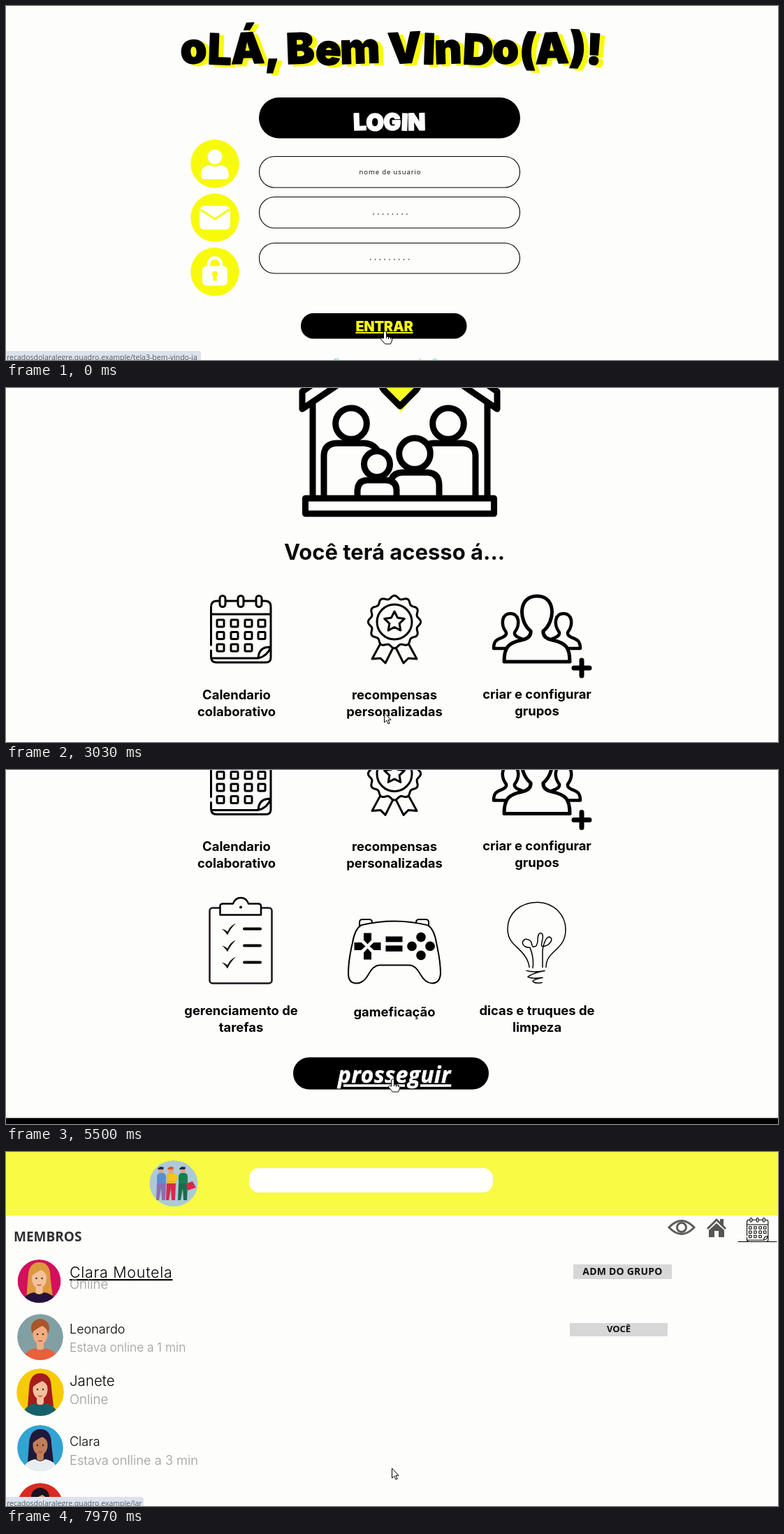
An HTML page that plays this animation: 1105 by 507 pixels, repeating every 8000 ms.

```html
<!DOCTYPE html>
<html lang="pt">
<head>
<meta charset="utf-8">
<style>
  html, body { margin: 0; width: 100%; height: 100%; overflow: hidden; background: #fdfdfb; }
  svg { display: block; width: 1105px; height: 507px; }
  text { white-space: pre; }
  .display { font-family: Inter, sans-serif; font-weight: 900; stroke-width: 1.6; stroke-linejoin: round; }
  .body { font-family: Lato, sans-serif; letter-spacing: 1px; word-spacing: 2.6px; stroke: #000; stroke-width: .5; }
  .label { font-family: Inter, sans-serif; font-weight: 700; }
  .name { font-family: Inter, sans-serif; font-weight: 300; }
  .open { font-family: "Open Sans", sans-serif; }
  .bold { font-family: "Open Sans", sans-serif; font-weight: 700; }
  .mid { text-anchor: middle; }
  .italic { font-style: italic; }
  .link { text-decoration: underline; }
  .line { fill: #fdfdfb; stroke: #000; stroke-linejoin: round; stroke-linecap: round; }
  .open-line { fill: none; stroke: #000; stroke-linejoin: round; stroke-linecap: round; }
</style>
</head>
<body>
<svg id="stage" viewBox="0 0 1105 507"></svg>
<script>
const stage = document.getElementById('stage');
const PAPER = '#fdfdfb', YELLOW = '#f8fa0c';

const text = (x, y, size, cls, str, fill = '#000', extra = '') =>
  `<text x="${x}" y="${y}" font-size="${size}" class="${cls}" fill="${fill}" ${extra}>${str}</text>`;
const box = (x, y, w, h, r, fill, extra = '') =>
  `<rect x="${x}" y="${y}" width="${w}" height="${h}" rx="${r}" fill="${fill}" ${extra}/>`;
const dot = (x, y, r, fill, extra = '') => `<circle cx="${x}" cy="${y}" r="${r}" fill="${fill}" ${extra}/>`;
const line = (d, w, cls = 'open-line', extra = '') => `<path d="${d}" class="${cls}" stroke-width="${w}" ${extra}/>`;
const fill = (d, color, extra = '') => `<path d="${d}" fill="${color}" ${extra}/>`;
const at = (x, y, content, scale = 1) => `<g transform="translate(${x} ${y}) scale(${scale})">${content}</g>`;
const each = (list, fn) => list.map(fn).join('');

function title(x, y, size, str, dx, dy, rotate) {
  const tilt = `rotate="${rotate}"`;
  return text(x + dx, y + dy, size, 'display mid', str, YELLOW, `${tilt} stroke="${YELLOW}"`) +
    text(x, y, size, 'display mid', str, '#000', `${tilt} stroke="#000"`);
}

function polar(n, radius) {
  return 'M' + Array.from({ length: n }, (_, i) => {
    const a = i / n * 2 * Math.PI, r = radius(i, a);
    return (r * Math.sin(a)).toFixed(1) + ' ' + (-r * Math.cos(a)).toFixed(1);
  }).join('L') + 'Z';
}

const calendar =
  line('M1.5 72V18Q1.5 9 9 9H79Q87 9 87 17V90Q87 97 80 97H9Q1.5 97 1.5 89V80M1.5 28H87M2 91H69Q82 88 87 75Q70 74 69 91', 3) +
  each([18, 44, 70], x => box(x - 4, 1.5, 8, 16, 4, PAPER, 'stroke="#000" stroke-width="3"')) +
  each([36, 53.5, 71], (y, r) => each([10, 30, 50, 69].slice(0, r === 2 ? 3 : 4),
    x => box(x, y, 10, 10, 1.5, 'none', 'stroke="#000" stroke-width="3"')));

const tail = line('M-20 31L-32 53L-20 52L-13 59L-1 35', 3);
const ribbon = tail + `<g transform="scale(-1 1)">${tail}</g>` +
  line(polar(120, (i, a) => 35.5 + 2.2 * Math.cos(12 * a)), 3, 'line') +
  dot(0, 0, 25, 'none', 'stroke="#000" stroke-width="3"') +
  line(polar(10, i => i % 2 ? 7.5 : 15), 3);

// Login
const icons = [
  dot(0, -10, 10.5, '#fff') + fill('M-20 16Q-19 2 -7 2Q0 6 7 2Q19 2 20 16Q20 22 14 22H-14Q-20 22 -20 16Z', '#fff'),
  box(-22, -17, 44, 34, 7, '#fff') + `<path d="M-21 -12L0 2L21 -12" fill="none" stroke="${YELLOW}" stroke-width="3"/>`,
  box(-18, -8, 36, 28, 6, '#fff') + '<path d="M-9 -6V-11A9 9 0 0 1 9 -11V-6" fill="none" stroke="#fff" stroke-width="4.5"/>' +
    dot(0, 3, 4, YELLOW) + fill('M-2 4H2L3 13H-3Z', YELLOW)
];
const login =
  title(551.5, 83, 60.5, 'oLÁ, Bem VInDo(A)!', 7, 3, '-3 2 -2 0 0 -2 3 -2 0 -3 2 -2 3 -2 2 -2 2 3') +
  box(362, 131, 374, 58.5, 29, '#000') +
  text(549, 178, 33, 'display mid', 'LOGIN', '#fff', 'stroke="#fff" rotate="-2 2 -2 2 -1"') +
  each([[215, 45], [273, 45], [339, 44]], ([y, h]) =>
    box(362.5, y + .5, 373, h - .5, 22, PAPER, 'stroke="#000" stroke-width="1.1"')) +
  text(550, 241, 9.5, 'open mid', 'nome de usuario', '#000', 'letter-spacing=".9"') +
  text(552, 299, 10, 'bold mid', '........', '#243', 'letter-spacing="4"') +
  text(551, 364, 10, 'bold mid', '.........', '#243', 'letter-spacing="4"') +
  each(icons, (icon, i) => at(299, 226 + 77.3 * i, dot(0, 0, 34.7, YELLOW) + icon)) +
  box(422, 440, 237.5, 36.5, 18, '#000') +
  text(541.5, 466, 20, 'display mid link', 'ENTRAR', YELLOW, 'letter-spacing="-.3"') +
  text(543, 517, 17, 'open mid', 'Esqueceu a senha?', '#6fe0e4');

// Introduction, laid out as one tall scrolling page
const house =
  line('M439 433V570M689 433V570', 9) +
  line('M564 322L703 417V442L564 347L424 442V417Z', 9, 'line') +
  fill('M536 411L565 446L591 415Z', YELLOW) +
  line('M564 438L541 415C530 401 544 388 556 395Q562 399 564 404Q566 399 572 395C584 388 598 401 587 415Z', 9, 'open-line', 'style="fill:#f8fb22"') +
  line('M455 568V508Q456 491 475 491H513Q529 492 535 508V568', 9, 'line') +
  line('M672 568V508Q671 491 652 491H612Q596 492 592 508V568', 9, 'line') +
  each([494, 633], x => dot(x, 463, 22.3, PAPER, 'stroke="#000" stroke-width="9"')) +
  line('M551 568V545Q554 533 568 533H604Q620 534 620 552V568', 9, 'line') +
  dot(585, 506, 22.3, PAPER, 'stroke="#000" stroke-width="9"') +
  line('M503 568V558Q504 544 518 544H544Q559 545 559 558V568', 9, 'line') +
  dot(531, 521, 18.5, PAPER, 'stroke="#000" stroke-width="9"') +
  box(428.5, 570, 270, 22, 0, PAPER, 'class="line" stroke-width="9"');

const sidePerson = line('M698 373C698 361 704 360 711 357Q717 354 716 350C707 338 710 323 722 323C734 323 737 338 728 350Q727 354 733 357L740 360V373Z', 4.5, 'line');
const team = sidePerson + `<g transform="translate(1520 0) scale(-1 1)">${sidePerson}</g>` +
  line('M713 392C713 370 720 365 738 361Q752 358 751 348C734 335 732 298 760 298C788 298 786 335 769 348Q768 358 782 361C800 365 807 370 807 392Z', 5, 'line') +
  line('M813 401H835M824 390V412', 7);

const clipboard =
  box(291.5, 280, 89, 108, 4, PAPER, 'stroke="#1b1418" stroke-width="2.5"') +
  line('M306.5 290V278Q306 274 311 274H325Q328 265.5 336 265.5Q344 265.5 347 274H361Q365 274 365 278V290Z', 2.5, 'line') +
  dot(336, 279, 2, '#000') +
  each([310, 334, 358], y => fill(`M309 ${y}Q314 ${y + 1} 317 ${y + 4}Q321 ${y - 5} 329 ${y - 8}Q321 ${y} 317 ${y + 9}Q314 ${y + 4} 309 ${y}Z`, '#1b1418') +
    line(`M341 ${y}H364`, 4));

const gamepad =
  each([506, 587], x => box(x, 296.5, 18, 14, 4, PAPER, 'stroke="#000" stroke-width="2"')) +
  line('M508 305Q556 293 604 305Q613 311 616 330Q622 357 622 374Q621 388 610 388Q600 388 593 375Q586 362 577 362H535Q526 362 519 375Q512 388 502 388Q490 388 490 374Q490 355 496 330Q499 311 508 305Z', 2, 'line') +
  each([0, 90, 180, 270], a => fill('M-5.5 -19H5.5V-9L0 -3L-5.5 -9Z', '#000', `transform="translate(517.5 335) rotate(${a})"`)) +
  box(543.5, 321, 24, 8, 0, '#000') + box(543.5, 334, 24, 8.5, 0, '#000') +
  each([[0, -13], [0, 13], [-13, 0], [13, 0]], ([x, y]) => dot(594 + x, 335 + y, 6.8, '#000'));

const bulb = line('M749 365Q748 353 736 341C728 333 718 327 718 310C718 288 736 272 760 272C784 272 801 290 801 311C801 342 773 340 773 365M754 366Q756 352 750 337C734 336 739 323 746 325C757 327 749 339 758 335C764 331 758 318 765 316C773 317 764 334 767 335C776 336 783 327 780 323C774 317 768 334 768 343V365M745 370Q756 373 771 370Q752 374 747 379Q752 382 768 380Q756 382 754 385Q756 389 767 387', 1.5);

const paragraph = [
  'Olá,  Esse app foi criado pra dar uma mãozinha pros',
  'filhos na hora de deixar a casa arrumada e limpa!',
  'Além disso, ele também promove um ambiente mais',
  'tranquilo e fortalece os laços familiares.'
];
const captions = [
  [330, 858, 'Calendario', 'colaborativo'], [556, 858, 'recompensas', 'personalizadas'],
  [760, 857, 'criar e configurar', 'grupos'], [336.5, 1093, 'gerenciamento de', 'tarefas'],
  [556, 1095, 'gameficação', ''], [760, 1093, 'dicas e truques de', 'limpeza']
];
const intro =
  title(561, 73, 50, 'JÁ ARRUMEI!', 6, -1, '-3 2 0 -2 2 -2 3 -2 2 -2 3') +
  each(paragraph, (str, i) => text(564.5, 147 + 46.3 * i, 34.5, 'body mid', str)) +
  house +
  text(556, 658, 31, 'label mid', 'Você terá acesso á...', '#0a0a0a') +
  at(292, 708, calendar) + at(556, 747, ribbon) + at(0, 412, team) +
  at(0, 659, clipboard + gamepad + bulb) +
  each(captions, ([x, y, a, b]) => text(x, y, 18.4, 'label mid', a) + text(x, y + 23.5, 18.4, 'label mid', b)) +
  box(411, 1153, 280, 46, 23, '#000') +
  text(556, 1190, 31.5, 'bold italic mid link', 'prosseguir', '#fff', 'letter-spacing=".6" stroke="#fff" stroke-width=".6"') +
  box(0, 1240, 1105, 300, 0, '#000');

// Group settings
const cards = [
  [253, 226, 133, 133, 319.5, 337, 'Foto do grupo'], [407, 226, 134, 133, 473, 346, 'Calendario'],
  [559, 220, 134, 139, 631, 337, 'Premios'], [720, 221, 134, 133, 787, 337, 'Membros']
];
const photo =
  '<path d="M287 297V254H346" fill="none" stroke="#000" stroke-width="4"/>' +
  box(294.5, 261, 57, 42, 0, '#f2f2f2', 'stroke="#000" stroke-width="4"') + dot(314, 269, 4.5, '#000') +
  fill('M299 299L312 278L319 288L330 270L348 299Z', '#000');
const members = '<g fill="none" stroke="#1c2340" stroke-width="2">' +
  '<path d="M765 246A8 8 0 1 1 771 259M817 246A8 8 0 1 0 811 259M776 263C760 259 749 269 755 276Q758 279 778 278M806 263C822 259 833 269 828 276Q825 279 805 278"/>' +
  '<ellipse cx="791.5" cy="300" rx="27.5" ry="10.5" fill="#fff"/>' +
  '<circle cx="791.5" cy="274.5" r="14" fill="#fff"/><path d="M778 271Q788 273 792 261Q795 272 805 273"/></g>';
const group =
  text(555, 45, 35.5, 'display mid', 'NOME DO GRUPO:', '#000', 'stroke="#000" letter-spacing="-1.5" rotate="-2 2 -1 2 0 -2 2 0 -2 2 -1 2 0"') +
  box(327, 66.5, 456, 53.5, 27, PAPER, 'stroke="#000" stroke-width="1.2"') +
  box(434, 146, 233.5, 36.5, 18, '#f7f916') +
  text(551.5, 173, 16, 'display mid', 'conFIGurações(exTrAs)', '#000', 'stroke="#000" style="stroke-width:.5"') +
  each(cards, ([x, y, w, h, tx, ty, str]) => box(x, y, w, h, 13, '#eeeeee') +
    text(tx, ty, 13.5, 'bold mid', str, '#000', 'letter-spacing=".5"')) +
  photo + at(442, 242, calendar, .735) + at(630.5, 263.5, ribbon, .78) + members +
  box(391, 396, 316.5, 9, 4.5, '#000', 'stroke="#000" stroke-width="2"') + box(393, 397, 314, 7.5, 3.7, '#f7f916') +
  box(439, 438, 200, 33, 16.5, '#000') +
  text(541.5, 462, 19.5, 'open italic mid link', 'finalizar...', '#fff');

// Member list
function avatar(i, y, r, back, hair, skin, shirt, longHair) {
  const id = 'face' + i;
  return `<clipPath id="${id}"><circle r="${r}"/></clipPath>` + at(r > 31 ? 49 : 47.5, y,
    `<g clip-path="url(#${id})">` + dot(0, 0, r, back) +
    (longHair ? fill('M-16 -6Q-15 -27 0 -27Q16 -27 16 -6L19 20H-18Z', hair) : dot(0, -13, 13, hair)) +
    box(-5, 4, 10, 14, 4, skin) + fill('M-26 38Q-25 19 -7 16Q0 22 7 16Q25 19 26 38Z', shirt) +
    `<ellipse cy="-4" rx="10.5" ry="14" fill="${skin}"/>` +
    fill('M-12 -6Q-14 -23 0 -24Q14 -23 12 -6Q9 -13 3 -16Q-6 -12 -12 -6Z', hair) +
    dot(-4, -4, 1.2, '#302020') + dot(4, -4, 1.2, '#302020') +
    line('M-3 5Q0 7 3 5', 1.5, '', 'fill="none" stroke="#c2373c"') + '</g>');
}
const person = (x, hair, top, legs) => at(x, 30,
  dot(0, -4, 4, '#e3a083') + fill('M-5 -5Q-3 -11 4 -8L3 -5Z', hair) + box(-6, 0, 13, 18, 5, top) +
  fill('M-6 15H7L6 39H1L0 22L-3 39H-7Z', legs));
const badge = '<ellipse cx="240" cy="45" rx="34.5" ry="33" fill="#adc9d6"/>' +
  person(222, '#27325c', '#5b8fd0', '#8c6fb4') + person(236, '#d6582d', '#f0b81d', '#d9284b') +
  person(253, '#1f2b4c', '#15804f', '#1c6b4c') + fill('M258 45L267 42L272 51L260 55Z', '#d9284b') + box(232, 32, 13, 9, 1, '#f5c51b');
const list =
  box(0, 0, 1105, 91, 0, '#f8fa43') + badge + box(348, 23, 349, 35, 14, '#fffffc') +
  text(11, 128, 19, 'bold', 'MEMBROS', '#303030') +
  '<g fill="none" stroke="#5c5c5c" stroke-width="3"><path d="M949 108Q967 89 985 108Q967 127 949 108Z"/><circle cx="967" cy="108" r="6.5"/></g>' +
  fill('M1003 109L1017 95L1022 100V96H1027V105L1031 109L1029 111L1017 99L1005 111ZM1006 112L1017 102L1028 112V122H1020V113H1014V122H1006Z', '#555') +
  at(1060, 94, calendar, .355) + line('M1048 128.5H1103', 1.2) +
  avatar(0, 185, 31, '#d3105b', '#dc9a3c', '#f3c19c', '#24123c', true) +
  avatar(1, 265, 33, '#82a0a3', '#a9562c', '#f0ad80', '#e8603c', false) +
  avatar(2, 344, 34, '#f6cb06', '#a51d1c', '#f3bf9c', '#14616b', true) +
  avatar(3, 424, 33, '#32a4d2', '#20183a', '#c07d57', '#e8eef0', true) +
  avatar(4, 507, 33, '#d92a20', '#171420', '#d99a70', '#333', false) +
  text(91, 180, 21.5, 'name link', 'Clara Moutela', '#000', 'letter-spacing=".7"') +
  text(91, 196, 18.5, 'name', 'Online', '#999') +
  text(91, 260, 18, 'name', 'Leonardo') + text(91, 286, 17.3, 'name', 'Estava online a 1 min', '#999') +
  text(91, 335, 20.5, 'name', 'Janete') + text(91, 361, 18.5, 'name', 'Online', '#999') +
  text(91, 421, 18, 'name', 'Clara') + text(91, 448, 18.3, 'name', 'Estava onlline a 3 min', '#999') +
  box(812, 161, 141, 21, 0, '#d7d7d7') + text(882.5, 176, 14, 'bold mid', 'ADM DO GRUPO', '#111', 'letter-spacing=".2"') +
  box(807, 245, 140, 19, 0, '#d7d7d7') + text(877, 258, 13, 'bold mid', 'VOCÊ', '#111');

const status = (w, str) => fill(`M0 494H${w - 4}Q${w} 494 ${w} 498V507H0Z`, '#dde3ec') + text(1, 507, 10.5, 'open', str, '#555b63');
const site = 'recadosdolaralegre.quadro.example';
const layer = (id, content) => `<g id="${id}">${content}</g>`;
stage.innerHTML = box(0, 0, 1105, 507, 0, PAPER) +
  layer('login', login) + layer('intro', intro) + layer('group', group) + layer('list', list) +
  layer('longStatus', status(279, site + '/tela3-bem-vindo-ja')) + layer('shortStatus', status(197, site + '/lar')) +
  layer('arrow', '<path d="M0 0V14L3.2 11L5.5 16L7.7 15L5.4 10.3H9.5Z" fill="#fff" stroke="#000"/>') +
  layer('hand', '<path d="M0 2Q2 -1 4 2V8L11 10Q13 11 12 14L10 19H2L-4 12Q-4 9 0 11Z" fill="#fff" stroke="#000"/><path d="M4 8V11M7 9V12M10 10V12" stroke="#000"/>');

const el = id => document.getElementById(id);
const show = (id, on) => el(id).style.display = on ? '' : 'none';
const ramp = (t, start, length) => Math.min(1, Math.max(0, (t - start) / length));
const ease = p => p * p * (3 - 2 * p);

const TURNS = [900, 5900, 7700];
const PAGES = ['login', 'intro', 'group', 'list'];
const NOTCHES = [1800, 1930, 2060, 2190, 2330, 3450, 3600, 3760, 4680];

function draw(now) {
  const t = now % 8000;
  const current = TURNS.filter(turn => t >= turn).length;
  PAGES.forEach((id, i) => show(id, i === current));

  const scroll = NOTCHES.reduce((sum, start) => sum + 82.4 * ease(ramp(t, start, 150)), 0);
  el('intro').setAttribute('transform', `translate(0 ${-scroll})`);

  el('longStatus').style.opacity = t < 3000 ? 1 - ramp(t, 1080, 220) : ramp(t, 5600, 120) - ramp(t, 6150, 220);
  el('shortStatus').style.opacity = ramp(t, 7250, 120);

  const hand = t < 900 || t >= 5330 && t < 5900 || t >= 7100 && t < 7700;
  const toButton = ease(ramp(t, 5060, 340)), down = ease(ramp(t, 7020, 200));
  const x = 541.5 + 11 * toButton, y = 465 - 23 * toButton + 11 * down;
  show('hand', hand);
  show('arrow', !hand);
  el('arrow').setAttribute('transform', `translate(${x} ${y})`);
  el('hand').setAttribute('transform', `translate(${x - 1} ${y})`);
  requestAnimationFrame(draw);
}
draw(0);
</script>
</body>
</html>
```
